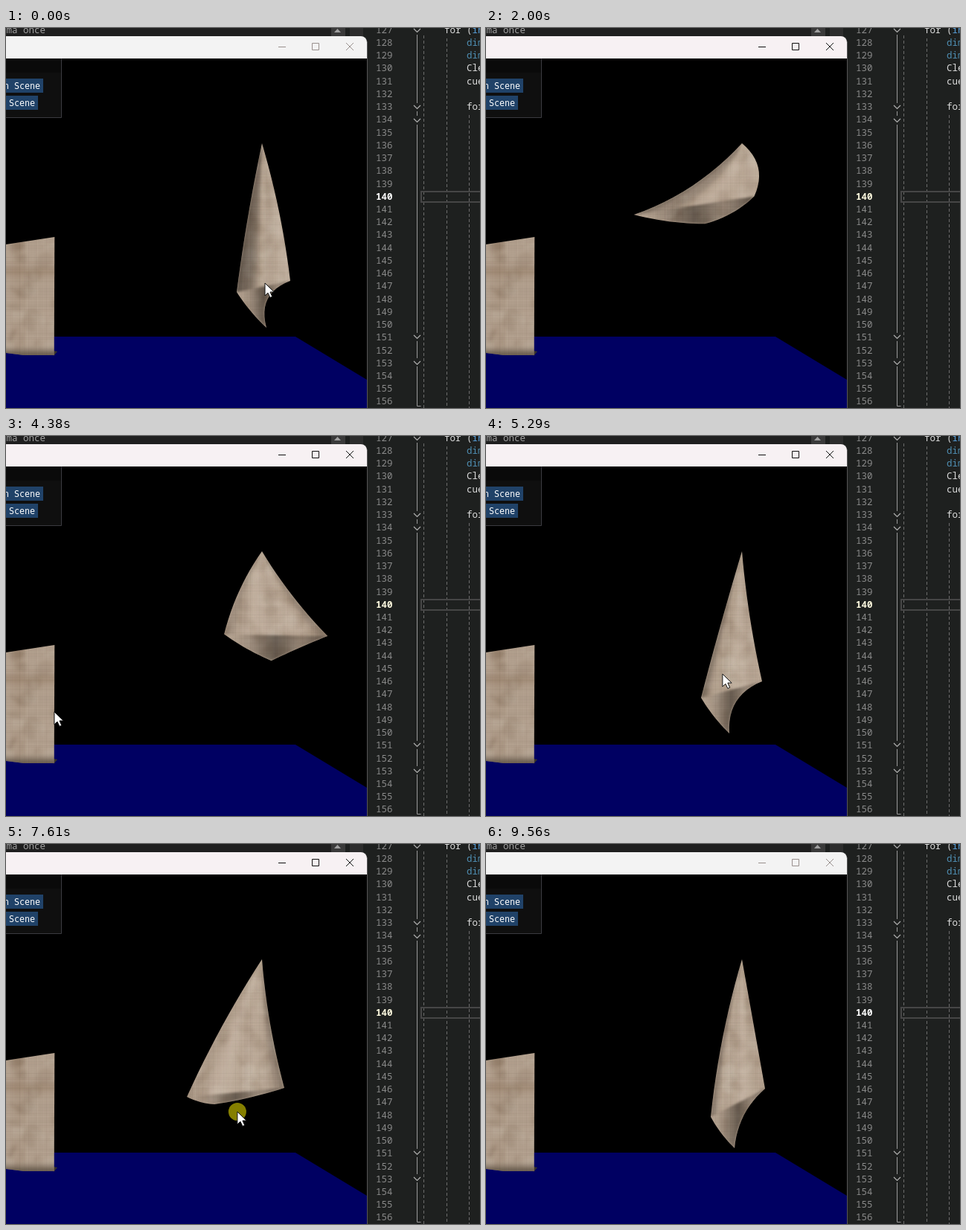
Animation of 637 by 511 pixels, one loop 9.62 s. Source, as an HTML page with a canvas:

```html
<!DOCTYPE html>
<html lang="en">
<head>
<meta charset="utf-8">
<title>Cloth simulation</title>
<style>
  html, body { margin: 0; width: 100%; height: 100%; overflow: hidden; background: #000; }
  svg, canvas { position: absolute; left: 0; top: 0; width: 637px; height: 511px; }
  .code { font: 500 12.5px "Noto Sans Mono", monospace; fill: #dcdcdc; white-space: pre; }
  .num { fill: #8a8a8a; }
  .current { fill: #fff; font-weight: 700; }
  .blue { fill: #569cd6; }
  .type { fill: #4f8fb4; }
  .ui { font: 11.63px "DejaVu Sans Mono", monospace; fill: #fff; white-space: pre; }
  .bar { fill: #f3f3f3; }
  .icons { fill: none; stroke: #99908d; }
  .active .bar { fill: #f7f1f3; }
  .active .icons { stroke: #111; }
  .active .current { fill: #fffbe0; }
</style>
</head>
<body>
<svg id="desk" viewBox="0 0 637 511">
  <rect width="637" height="511" fill="#1e201f"/>
  <rect width="437" height="11" fill="#1f1f1f"/>
  <text class="code" x="-7" y="6.5" style="fill:#a0a0a0">gma once</text>
  <path fill="#3a3a3a" d="M437 0h19v11h-19z"/>
  <path fill="#2d2d2d" d="M462 0h18v11h-18z"/>
  <path fill="#a0a0a0" d="M441 6l4.5-5 4.5 5z"/>
  <g id="editor"></g>

  <path fill="#555" d="M485 18h1v493h-1z"/>
  <path class="bar" d="M0 11h477a8 8 0 0 1 8 8v22H0z"/>
  <path class="icons" d="M366 25.5h10M411.5 20.5h9v9h-9zM457 20l10 10M467 20l-10 10"/>
  <path d="M0 41h485v470H0z"/>
  <path fill="#000062" d="M0 415h389l96 58v38H0z"/>

  <path fill="#0f0f0f" stroke="#3b3b40" d="M-1 41.5h75.5v79H-1z"/>
  <path fill="#0a0a0a" d="M0 41h74v19H0z"/>
  <path fill="#204268" d="M0 68h50v19H0zM0 91h43v19H0z"/>
  <text class="ui" x="-3" y="82">n Scene</text>
  <text class="ui" x="4" y="105">Scene</text>
</svg>
<canvas id="stage" width="637" height="511"></canvas>

<script>
const LOOP = 9620, FRAMES = 138, STEP = LOOP / FRAMES;
const W = 637, H = 511, PIN = [344, 155];
const desk = document.getElementById('desk');
const ctx = document.getElementById('stage').getContext('2d');

function buildEditor() {
  const text = (x, n, cls, s) =>
    `<text class="code ${cls}" x="${x}" y="${6.8 + (n - 127) * 17.23}">${s}</text>`;
  let out = '';
  for (let n = 127; n <= 156; n++) out += text(497, n, n === 140 ? 'current' : 'num', n);
  out += text(589, 127, '', 'for (<tspan class="blue">int</tspan>');
  out += text(619, 128, 'type', 'dim') + text(619, 129, 'type', 'dim');
  out += text(619, 130, '', 'Cle') + text(619, 131, '', 'cue') + text(619, 133, '', 'for');
  out += '<path fill="none" stroke="#9a9a9a" d="M552.5 9V101M552.5 112V118M552.5 130V410M552.5 421V444M552.5 455V508.5h5"/>';
  for (const y of [3, 106, 124, 415, 450])
    out += `<path fill="none" stroke="#b0b0b0" stroke-width="1.2" d="M548 ${y - 2}l4.5 4.5 4.5-4.5"/>`;
  out += '<path stroke="#6c6c6c" stroke-dasharray="4 3" d="M561.5 10V511M592.5 14V511M622.5 117V511"/>';
  out += '<path fill="none" stroke="#464646" stroke-width="2" d="M640 220H558v14h82"/>';
  document.getElementById('editor').innerHTML = out;
}

const mix = (a, b, k) => Array.isArray(a) ? a.map((v, i) => mix(v, b[i], k)) : a + (b - a) * k;

// A pose is three free corners, how far each side bows outward, and where across it is lit.
const pose = (right, tip, left, bow, lit) => [right, tip, left, bow, lit];
const furled = pose([382, 340], [350, 403], [310, 355], [4, -16, 2], .85);
const flung = pose([360, 226], [294, 263], [198, 251], [14, 5, -11], .75);
const billow = pose([378, 322], [275, 364], [250, 327], [-4, 4, 17], .35);
const drape = pose([371, 330], [327, 400], [289, 352], [-3, -15, 1], .65);
const curled = pose([414, 215], [345, 253], [256, 197], [11, 16, 5], .45);
const sail = pose([374, 328], [280, 350], [243, 340], [-4, 2, 4], .4);
const folded = pose([375, 329], [334, 409], [302, 367], [0, -9, 5], .6);

const flip = ([x, y]) => [2 * PIN[0] - x, y];
const mirror = ([right, tip, left, [r, hem, l], lit]) =>
  pose(flip(left), flip(tip), flip(right), [l, hem, r], 1 - lit);
const swing = mix(mirror(flung), drape, .35);

const clothKeys = [
  [0, furled], [2000, flung], [2480, swing], [3540, billow], [4050, flung], [4520, swing],
  [5290, drape], [6350, curled], [7000, furled], [7610, sail], [8080, flung], [8550, swing],
  [9560, folded]
];
const cursorKeys = [
  [0, [348, 343]], [350, [335, 355]], [950, [-30, 300]], [2150, [-30, 360]], [3540, [318, 357]],
  [4100, [20, 380]], [5290, [318, 320]], [5950, [30, 400]], [6350, [41, 415]],
  [7610, [311, 360]], [8080, [60, 350]], [9050, [540, 530]]
];
const presses = [[300, 950], [3450, 4100], [5480, 5950], [7500, 8080]];

function valueAt(keys, t) {
  const i = keys.findIndex(key => key[0] > t);
  if (i < 0) return keys.at(-1)[1];
  const [[from, a], [to, b]] = [keys[i - 1], keys[i]];
  const k = (t - from) / (to - from);
  return mix(a, b, k * k * (3 - 2 * k));
}

function makeLinen() {
  const tile = new OffscreenCanvas(W, H), g = tile.getContext('2d');
  let seed = 7;
  const rand = () => (seed = seed * 16807 % 2147483647) / 2147483647;
  g.fillStyle = '#b5a391';
  g.fillRect(0, 0, W, H);
  g.filter = 'blur(2px)';
  for (let i = 0; i < 900; i++) {
    g.fillStyle = rand() < .5 ? 'rgba(112,88,64,.13)' : 'rgba(222,211,198,.14)';
    g.beginPath();
    g.ellipse(rand() * W, rand() * H, 3 + rand() * 10, 2 + rand() * 9, rand() * 3, 0, 7);
    g.fill();
  }
  g.filter = 'none';
  for (let i = 0; i < W; i += 2) {
    g.fillStyle = `rgba(70,50,35,${rand() * .09})`;
    g.fillRect(0, i, W, 1);
    g.fillRect(i, 0, 1, H);
  }
  return ctx.createPattern(tile, 'repeat');
}

// Samples a side from a to b that bows outward by h at its middle.
function side(a, b, h, steps = 12) {
  const [dx, dy] = [b[0] - a[0], b[1] - a[1]];
  const len = Math.hypot(dx, dy) || 1;
  return Array.from({ length: steps + 1 }, (_, i) => {
    const k = i / steps, lift = 4 * h * k * (1 - k) / len;
    return [a[0] + dx * k + dy * lift, a[1] + dy * k - dx * lift];
  });
}

function fillShape(points, style) {
  ctx.beginPath();
  points.forEach(p => ctx.lineTo(...p));
  ctx.closePath();
  ctx.fillStyle = style;
  ctx.fill();
}

const shade = tone => `rgba(${tone < 0 ? '12,7,3' : '240,226,212'},${Math.abs(tone)})`;

function drawStill() {
  fillShape([[64, 434], [69, 435], [64, 441]], '#39332d');
  ctx.save();
  fillShape([[0, 291], [65.3, 281], [64.7, 440], [24, 440], [0, 437]], linen);
  ctx.clip();
  ctx.filter = 'blur(4px)';
  ctx.fillStyle = 'rgba(112,80,52,.25)';
  ctx.fillRect(-9, 322, 80, 11);
  ctx.fillRect(14, 285, 5, 160);
  ctx.fillStyle = 'rgba(45,35,25,.55)';
  ctx.fillRect(-9, 434, 80, 16);
  ctx.restore();
}

function drawCloth(t) {
  const [right, tip, left, [bowRight, hem, bowLeft], lit] = valueAt(clothKeys, t);
  const rightSide = side(PIN, right, bowRight);
  const leftSide = side(left, PIN, bowLeft);
  const hemRight = side(right, tip, hem);
  const hemLeft = side(tip, left, Math.max(2, hem * .6));
  ctx.save();
  fillShape([...rightSide, ...hemRight, ...hemLeft, ...leftSide], linen);
  ctx.clip();
  ctx.filter = 'blur(1.5px)';

  const under = ctx.createLinearGradient(left[0], 0, right[0], 0);
  [.06, -.12, -.45, -.15, -.5].forEach((tone, i) => under.addColorStop(i / 4, shade(tone)));
  fillShape([...hemRight, ...hemLeft], under);

  leftSide.reverse();
  const column = u => leftSide.map((p, i) => mix(p, rightSide[i], u));
  const strips = 20;
  for (let i = 0; i < strips; i++) {
    const u = i / strips;
    const tone = .2 - 1.15 * (u - lit) ** 2 + .08 * Math.sin(u * 14 + lit * 9);
    fillShape([...column(u), ...column(u + 1 / strips).reverse()], shade(tone));
  }
  ctx.restore();
}

const arrow = new Path2D('M0 0V17L4 13.2L7 19.5L9.8 18.2L7 12H12.3Z');
function drawCursor(t) {
  const [x, y] = valueAt(cursorKeys, t);
  ctx.save();
  ctx.translate(x, y);
  if (presses.some(([from, to]) => t >= from && t < to)) {
    ctx.fillStyle = 'rgba(255,244,0,.52)';
    ctx.beginPath();
    ctx.arc(0, 0, 12, 0, 7);
    ctx.fill();
  }
  ctx.fillStyle = '#fff';
  ctx.strokeStyle = '#111';
  ctx.fill(arrow);
  ctx.stroke(arrow);
  ctx.restore();
}

function draw() {
  const tick = Math.min(FRAMES - 1, Math.floor((performance.now() % LOOP + 25) / STEP));
  const t = tick * STEP;
  desk.classList.toggle('active', t >= 350 && t < 9200);
  ctx.clearRect(0, 0, W, H);
  drawStill();
  drawCloth(t);
  drawCursor(t);
  requestAnimationFrame(draw);
}

buildEditor();
const linen = makeLinen();
draw();
</script>
</body>
</html>
```
